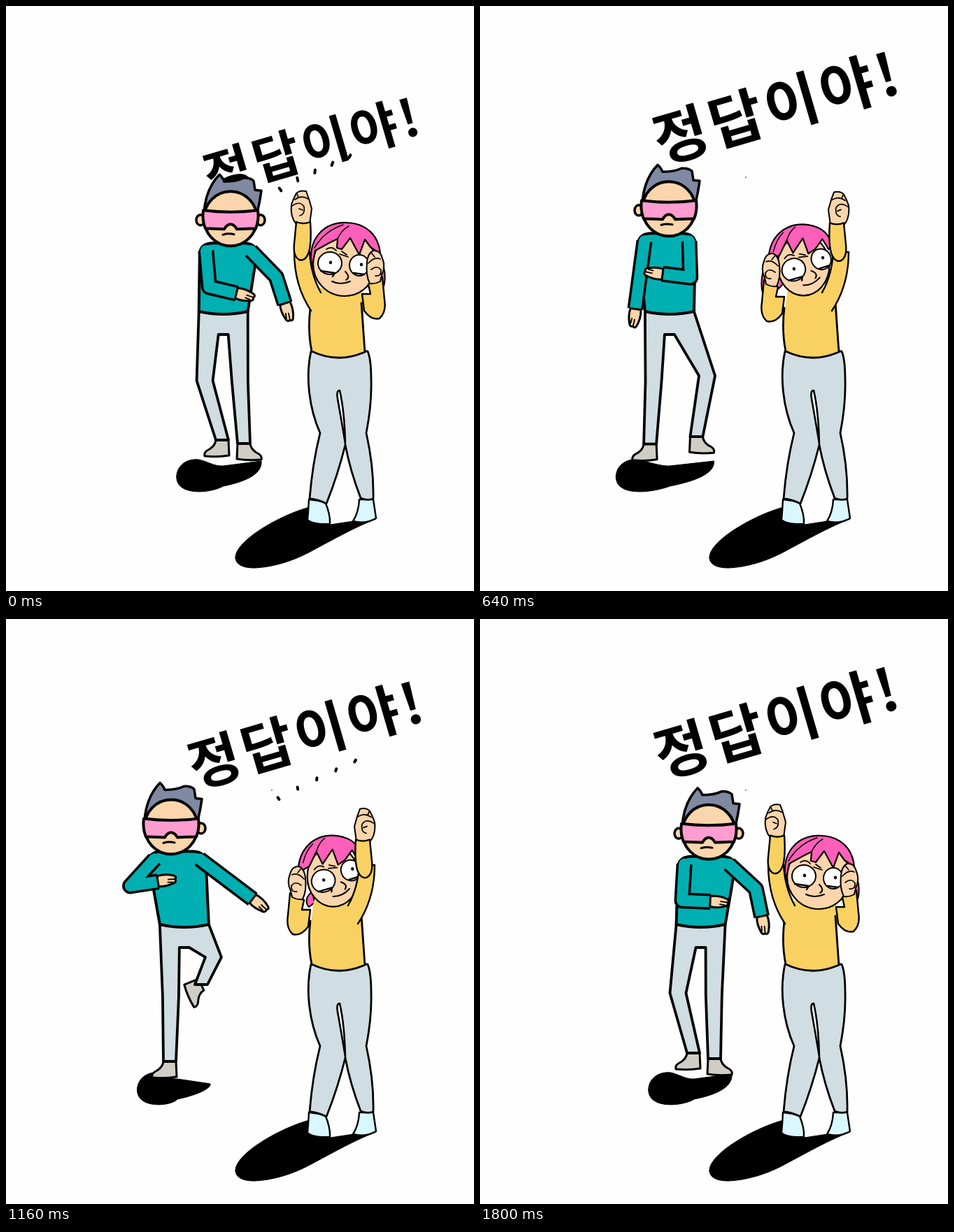
Recreate the animation shown at these times as an HTML page. Size 669 by 837 pixels, loop 1.84 s.

```html
<!DOCTYPE html>
<html lang="ko">
<head>
<meta charset="utf-8">
<style>
html, body { margin: 0; width: 100%; height: 100%; overflow: hidden; background: #fefefe; }
svg { display: block; width: 669px; height: 837px; }
text { font: 700 84px "Noto Sans CJK KR", "Noto Sans CJK JP", "Noto Sans CJK", sans-serif; letter-spacing: 5px; }
</style>
</head>
<body>
<svg id="stage" viewBox="0 0 669 837" stroke-linejoin="round"></svg>
<script>
const LOOP = 1840, STEP = 40, BEAT = 230;
const INK = '#000', SKIN = '#fbd5ab', TEAL = '#00afb1', PANTS = '#d0dde2', SHOE = '#cfcdc5',
      SLATE = '#7f8aa2', LENS = '#ff9cd0', PINK = '#ff5fb8', YELLOW = '#f9d162', SOCK = '#d9f8fe';

// Dance steps: head x, hands and ankles (left, right). Everything else is derived.
const steps = [
  { t: 0,    x: 321, hands: [[341, 414], [402, 437]], feet: [[309, 621], [340, 626]] },
  { t: 200,  x: 313, hands: [[278, 429], [342, 464]], feet: [[305, 541], [329, 628]] },
  { t: 480,  x: 294, hands: [[244, 453], [258, 388]], feet: [[252, 624], [321, 626]] },
  { t: 840,  x: 240, hands: [[191, 436], [238, 374]], feet: [[232, 630], [295, 604]] },
  { t: 1160, x: 236, hands: [[229, 374], [362, 408]], feet: [[234, 633], [279, 523]] },
  { t: 1560, x: 279, hands: [[315, 402], [398, 396]], feet: [[208, 599], [331, 629]] },
  { t: 1800, x: 327, hands: [[341, 405], [405, 437]], feet: [[305, 621], [335, 629]] }
];

const lerp = (a, b, u) => a + (b - a) * u;
const mix = (p, q, u) => [lerp(p[0], q[0], u), lerp(p[1], q[1], u)];
const clamp = u => Math.min(1, Math.max(0, u));
const path = (d, fill, width = 0) =>
  `<path d="${d}" fill="${fill}" stroke="${width ? INK : 'none'}" stroke-width="${width}" stroke-linecap="round"/>`;
const line = (d, width) => path(d, 'none', width);
const ellipse = (x, y, rx, ry, fill, width = 0) =>
  `<ellipse cx="${x}" cy="${y}" rx="${rx}" ry="${ry}" fill="${fill}" stroke="${width ? INK : 'none'}" stroke-width="${width}"/>`;
const group = (transform, body) => `<g transform="${transform}">${body}</g>`;
const mirror = (sum, body) => group(`matrix(-1 0 0 1 ${sum} 0)`, body);

// Joint between two equal bones; side picks the way it bends.
function joint(a, b, bone, side) {
  const dx = b[0] - a[0], dy = b[1] - a[1], d = Math.hypot(dx, dy);
  const bend = side * Math.sqrt(Math.max(0, bone * bone - d * d / 4)) / d;
  return [(a[0] + b[0]) / 2 + dy * bend, (a[1] + b[1]) / 2 - dx * bend];
}

function bodyAt(t) {
  const i = steps.findLastIndex(s => s.t <= t), a = steps[i];
  const b = steps[i + 1] || { ...steps[0], t: LOOP };
  const u = (t - a.t) / (b.t - a.t), w = 2 * Math.PI / LOOP;
  const turn = -Math.sin(w * t);
  const head = [lerp(a.x, b.x, u), 298 + 8 * Math.cos(w * (t + 200))];
  const hip = [86 + .7 * head[0] + 5 * turn, 437];
  const chest = [lerp(head[0], hip[0], .3) + 4 * turn, head[1] + 46];
  return {
    turn, head, hip, chest,
    hands: a.hands.map((h, k) => mix(h, b.hands[k], u)),
    feet: a.feet.map((f, k) => mix(f, b.feet[k], u))
  };
}

// 0 while the foot is on the floor, 1 when it hangs.
const liftOf = foot => clamp((616 - foot[1]) / 15);

function shadow(feet) {
  const x0 = feet[0][0] * .75 + 12, lift = liftOf(feet[1]);
  const tip = [feet[1][0] + 25 - 12 * lift, 651 + 14 * lift];
  const notch = lerp(x0, tip[0], .55);
  return path(`M${x0} 674C${x0} 658 ${x0 + 14} 647 ${x0 + 32} 649C${x0 + 45} 652 ${notch - 12} 659 ${notch} 658`
    + `L${tip}C${tip[0] + 2} 672 ${notch + 25} 682 ${notch} 687C${x0 + 50} 697 ${x0} 702 ${x0} 674Z`, INK, 1);
}

function shoe(ankle, side) {
  const tilt = 65 * liftOf(ankle);
  return group(`translate(${ankle}) scale(${side} 1) rotate(${tilt})`,
    path('M-9 0L-10 22Q6 25 25 23Q27 17 18 13Q10 8 9 0Z', SHOE, 3));
}

function trousers({ hip, feet }) {
  const half = side => {
    const ankle = feet[side < 0 ? 0 : 1], root = [hip[0] + 18 * side, 448];
    const reach = Math.hypot(ankle[0] - root[0], ankle[1] - root[1]);
    const knee = joint(root, ankle, Math.min(88.5, reach * .57), side);
    const at = (p, dx) => `${p[0] + dx * side} ${p[1]}`;
    return [at(hip, 35), at(knee, 11.5), at(ankle, 9), at(ankle, -9), at(knee, -11.5), at([hip[0], 470], 7)];
  };
  const outline = [...half(-1), ...half(1).reverse()];
  return shoe(feet[0], -1) + shoe(feet[1], 1) + path(`M${outline.join('L')}Z`, PANTS, 3.8);
}

function torso({ chest: [x, y], hip }) {
  return path(`M${x - 41} ${y + 2}Q${x - 38} ${y - 11} ${x - 22} ${y - 11}L${x + 22} ${y - 11}Q${x + 38} ${y - 11} ${x + 41} ${y + 2}`
    + `L${hip[0] + 35} ${hip[1]}Q${hip[0]} ${hip[1] + 8} ${hip[0] - 35} ${hip[1]}Z`, TEAL, 4);
}

function arm({ chest, hands }, side) {
  const hand = hands[side < 0 ? 0 : 1], shoulder = [chest[0] + 32 * side, chest[1]];
  const elbow = joint(shoulder, hand, 52, side), wrist = mix(elbow, hand, .78);
  const angle = Math.atan2(hand[1] - elbow[1], hand[0] - elbow[0]) * 180 / Math.PI;
  const sleeve = (color, width) =>
    `<polyline points="${[shoulder, elbow, wrist]}" fill="none" stroke="${color}" stroke-width="${width}"/>`;
  const palm = path('M-12 -8Q0 -10 12 -5Q16 -3 13 0Q15 5 8 6Q-2 9 -12 7Z', SKIN, 3) + line('M3 -1L13 0M2 3L9 4', 1.8);
  return sleeve(INK, 23) + sleeve(TEAL, 16) + ellipse(...shoulder, 8, 8, TEAL)
    + group(`translate(${hand}) rotate(${angle})`, palm);
}

function manHead({ head, turn }) {
  const ear = s => ellipse(s * 43, 2, 6, 7.5, SKIN, 3.5);
  return group(`translate(${head})`,
    (turn < .5 ? ear(-1) : '') + (turn > -.5 ? ear(1) : '')
    + path('M-38 -8Q-36 -42 -16 -63Q-12 -60 -9 -53Q8 -53 18 -58Q28 -59 33 -54L35 -41L44 -40Q42 -25 38 -8Z', SLATE, 3.5)
    + ellipse(0, 0, 38, 39, SKIN, 4)
    + path('M-39 -12Q0 -7 39 -12Q41 2 36 14L9 15Q5 8 0 8Q-5 8 -9 15L-36 14Q-41 2 -39 -12Z', LENS, 4)
    + line('M-11 23Q-3 20.5 5 22.5', 3));
}

const man = body => trousers(body) + torso(body) + arm(body, -1) + arm(body, 1) + manHead(body);

const womanShadow = path('M328 790C326 765 395 727 434 717L464 742L497 737L529 734C500 745 470 762 440 778C410 795 380 803 355 804C340 804 329 800 328 790Z', INK, 1);

const womanLegs =
  path('M433 706Q432 725 431 735Q438 742 463 741Q464 728 456 709Z', SOCK, 2.4)
  + path('M505 706Q504 725 496 737Q512 742 529 733L525 706Z', SOCK, 2.4)
  + path('M436 494C428 530 433 575 449 611Q438 655 434 705Q446 706 458 712Q474 672 485 628Q492 665 507 704Q516 708 525 705Q526 660 515 611Q523 570 522 535Q522 505 517 494Z', PANTS, 2.8)
  + path('M485 628Q484 580 477 550Q472 550 474 562Q479 590 485 626', '#fff', 2.6);

const womanTorso = path('M436 436L440 403L508 403L511 436L513 495Q475 512 437 494Q431 465 436 436Z', YELLOW)
  + line('M435 432Q431 465 437 494Q475 512 513 495Q511 465 508 425', 2.8);

const upperArm = path('M436 436Q412 400 412 352L434 352Q436 385 450 410', YELLOW, 2.4);

const forearm =
  path('M415 312Q406 302 408 284Q411 275 415 268Q420 263 429 265L433 276L437 290L434 312Z', SKIN, 2)
  + line('M409 286Q420 278 426 287Q428 298 420 300M413 277Q422 270 432 276M419 290L424 292M416 269L418 274', 1.7)
  + path('M415 309Q425 313 435 309Q437 338 433 352Q428 366 419 363Q410 358 412 340Z', YELLOW, 2.4);

const loweredArm =
  path('M509 412L512 436Q522 450 534 447Q544 438 541 420L538 388L518 398L521 412Z', YELLOW, 2.4)
  + path('M520 397Q514 385 516 367Q517 354 525 350Q535 349 538 361Q543 373 537 385L535 394Q528 398 520 397Z', SKIN, 2)
  + line('M518 368Q527 358 535 362M522 377Q531 370 536 378Q537 387 528 386M523 354L527 359', 1.7);

const womanFace =
  ellipse(463, 368, 17, 16, '#fff', 2) + ellipse(505, 371, 14, 15, '#fff', 2)
  + ellipse(464, 367, 2.2, 2.4, INK) + ellipse(508, 370, 2.2, 2.4, INK)
  + line('M450 379L470 382L467 387M497 382L512 384', 2.4)
  + line('M458 348Q466 343 472 350M477 355L489 359M480 351L487 356', 1.8)
  + line('M485 380Q493 388 486 392M466 394Q478 400 492 394', 2);

function womanA(drop, flying) {
  const lock = flying ? 'M525 345C545 365 544 397 537 407C525 405 510 400 505 390Z' : 'M510 394C521 398 522 408 516 413L506 404Z';
  return path(lock, PINK, 2) + womanTorso + upperArm + group(`translate(0 ${drop})`, forearm)
    + ellipse(484, 369, 45, 46, SKIN, 2.2) + womanFace
    + path('M437 374C430 330 457 309 487 310C515 311 533 328 535 355L521 345L513 334L505 356L492 332L480 348L473 346L474 333L462 339L442 350Z', PINK, 2.2)
    + line('M441 346Q455 322 482 313M474 333Q480 320 490 315', 1.5)
    + loweredArm;
}

function womanB(drop, flying) {
  const lock = flying ? 'M413 358C401 378 400 405 406 415C418 412 430 405 436 392Z' : 'M438 390C429 396 427 406 433 412L441 406Z';
  const head = ellipse(461, 372, 37, 43, SKIN, 2.2)
    + group('translate(447 378) rotate(-25) translate(-463 -368)', womanFace)
    + path('M411 366C411 330 435 313 460 313C480 314 497 322 501 342L497 349L488 334L478 348L468 355L460 333L446 354L437 336L427 357Z', PINK, 2.2)
    + line('M437 336Q441 323 449 317M418 352Q422 335 432 325', 1.5);
  return path(lock, PINK, 2) + womanTorso + group(`translate(${drop} ${-drop / 2})`, head)
    + mirror(939, upperArm) + mirror(935, group(`translate(0 ${drop})`, forearm))
    + mirror(944, group('translate(0 4)', loweredArm));
}

// Five sparks fly from beside her head to a row of dots under the lettering.
function sparkRow(u) {
  let row = '';
  for (let i = 0; i < 5; i++) {
    const x = lerp(400 + 16.5 * i, 387 + 30 * i, u);
    const y = lerp(281 - 13.5 * Math.sqrt(i), 251 - 15 * i, u);
    const angle = Math.atan2(y - 320, x - 432), half = 1 + 3.5 * (1 - u);
    const dx = Math.cos(angle) * half, dy = Math.sin(angle) * half;
    row += line(`M${x - dx} ${y - dy}L${x + dx} ${y + dy}`, 4);
  }
  return row;
}

function sparkLayer(beat) {
  const sinceHit = beat > BEAT / 2 ? beat - BEAT : beat;
  const u = (sinceHit + 32) / 52;
  return ellipse(380, 245, .8, .8, INK) + (u >= 0 && u < 1.6 ? sparkRow(Math.min(u, 1)) : '');
}

// Each hit squashes the lettering towards her head; it springs back fast and sinks slowly.
function lettering(beat) {
  const squash = Math.max(Math.exp(-beat / 11), Math.exp((beat - BEAT) / 18));
  const s = 1.01 - .13 * squash;
  return group(`translate(${259 + (1 - s) * 275} ${226 + (1 - s) * 380}) rotate(-16.3) scale(${s})`, '<text>정답이야!</text>');
}

function draw(t) {
  const beat = t % BEAT, swing = t % (2 * BEAT), body = bodyAt(t);
  const drop = 14 * clamp(beat / 20) * clamp(1 - beat / 200);
  const flying = beat < 5 || beat > 160;
  const woman = Math.abs(swing - BEAT) < BEAT / 2 ? womanB : womanA;
  stage.innerHTML = shadow(body.feet) + womanShadow + lettering(beat) + man(body)
    + womanLegs + woman(drop, flying) + sparkLayer(beat);
}

const stage = document.getElementById('stage');
const start = performance.now();
let shown = -1;
function tick(now) {
  const t = Math.floor(Math.max(0, now - start) % LOOP / STEP) * STEP;
  if (t !== shown) draw(shown = t);
  requestAnimationFrame(tick);
}
tick(start);
</script>
</body>
</html>
```
